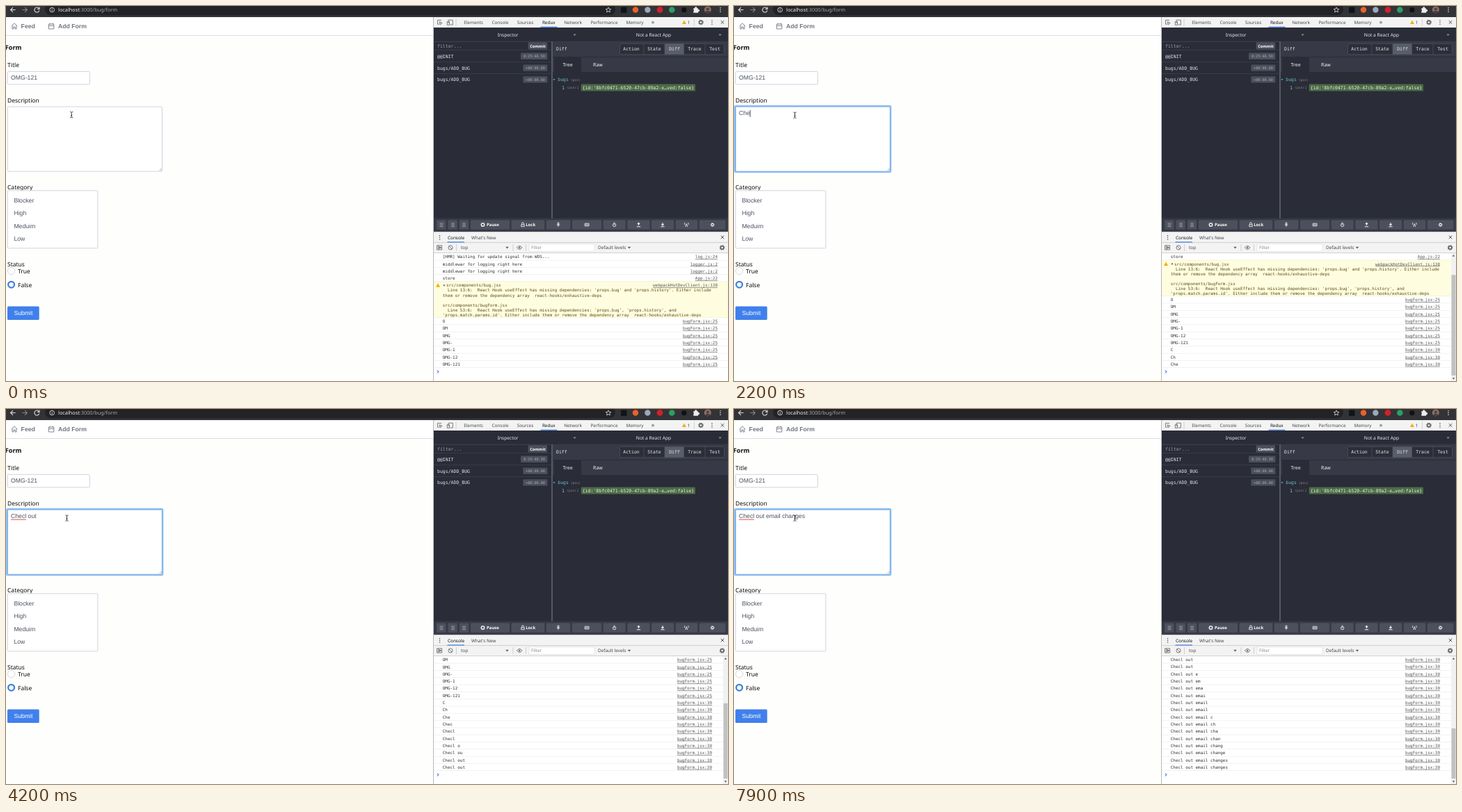
An HTML page for the animation above (8 s loop, 1038 by 540 pixels).

```html
<!DOCTYPE html>
<html lang="en">
<head>
<meta charset="utf-8">
<title>Bug form</title>
<style>
html, body { margin: 0; width: 100%; height: 100%; overflow: hidden; background: #fefefd; }
svg { display: block; }
text { white-space: pre; text-rendering: geometricPrecision; }
.ui { font: 6.4px "Noto Sans", sans-serif; fill: #44474b; }
.label { font: 8.5px "Noto Sans", sans-serif; fill: #0c0c0c; }
.field { font: 8.68px "Liberation Sans", Arial, sans-serif; fill: #4a5160; }
.nav { font: bold 8.68px "Liberation Sans", Arial, sans-serif; fill: #6f7480; }
.mono { font: 6.5px "DejaVu Sans Mono", monospace; fill: #e4e5ea; }
.log { font: 5.95px "DejaVu Sans Mono", monospace; fill: #303030; }
.mid { text-anchor: middle; }
.link { text-anchor: end; text-decoration: underline; fill: #545454; }
.warn { fill: #5c4a10; }
.box { fill: #fff; stroke: #cfd3de; }
.line { fill: none; stroke: #6e6e6e; }
.btn { fill: #4c505c; }
.glyph { fill: none; stroke: #f0f0f3; }
</style>
</head>
<body>
<svg id="stage" width="1038" height="540" viewBox="0 0 1038 540">
  <defs>
    <clipPath id="pane"><rect x="615" y="356" width="423" height="184"/></clipPath>
    <g id="gear"><circle r="2.2" fill="none" stroke="currentColor" stroke-width="1.5"/><circle r="3.3" fill="none" stroke="currentColor" stroke-width="1.1" stroke-dasharray="1.3 1.29"/></g>
    <g id="dots" fill="currentColor"><circle cy="-2.7" r=".8"/><circle r=".8"/><circle cy="2.7" r=".8"/></g>
    <path id="close" d="M-2.3-2.3 2.3 2.3M2.3-2.3-2.3 2.3" stroke="#555" stroke-width="1"/>
    <path id="down" d="M-2.2-1.1H2.2L0 1.5Z"/>
    <path id="alert" d="M0-2.9 3.1 2.6H-3.1Z" fill="#eeb312"/>
  </defs>

  <!-- page -->
  <rect width="615" height="540" fill="#fefefd"/>
  <rect y="16" width="615" height="26" fill="#fff"/>
  <rect y="42" width="615" height="1" fill="#dcdce2"/>
  <g fill="none" stroke="#757a86" stroke-width=".9">
    <path d="M8 28.6 12 25 16 28.6M9 28V33H10.9V30H13.1V33H15V28"/>
    <path d="M61.5 26H68.8V33H61.5ZM61.5 28.4H68.8M63.3 24.6V26.6M67 24.6V26.6"/>
  </g>
  <text class="nav" x="21.6" y="32.1">Feed</text>
  <text class="nav" x="74.9" y="32.1">Add Form</text>
  <text class="label" x="-1.2" y="62.6" style="font-size:9.1px;font-weight:bold">Form</text>
  <text class="label" x="2" y="88">Title</text>
  <text class="label" x="2" y="138.8">Description</text>
  <text class="label" x="2" y="264">Category</text>
  <text class="label" x="2" y="374.7">Status</text>
  <text class="label" x="17" y="385.2">True</text>
  <text class="label" x="17" y="404.6">False</text>
  <rect class="box" x="2.2" y="94.3" width="118.2" height="18.6" rx="1"/>
  <text class="field" x="7" y="106.3">OMG-121</text>
  <rect id="ring" x="1.2" y="144" width="224" height="95" rx="1.6" fill="none" stroke="#4292e6" stroke-opacity=".55" stroke-width="2.4"/>
  <rect id="area" class="box" x="2.4" y="145" width="222" height="93.2" rx="1"/>
  <path d="M220.4 237 223.6 233.8M222.2 237.2 223.8 235.6" stroke="#888" stroke-width=".6"/>
  <text id="typed" class="field" x="7" y="157.3"></text>
  <path id="spell" d="M7 159.2H29" stroke="#e0504c" stroke-width="1" fill="none"/>
  <rect id="caret" y="150" width=".9" height="9.6" fill="#333"/>
  <path id="mouse" d="M-2-4.2Q-.3-4.2 0-3.3Q.3-4.2 2-4.2M0-3.3V3.3M-2 4.2Q-.3 4.2 0 3.3Q.3 4.2 2 4.2M-1 1H1" fill="none" stroke="#222" stroke-width=".9"/>
  <rect class="box" x="2.2" y="265.8" width="129.7" height="83" rx="1"/>
  <text class="field" x="11.4" y="282.7">Blocker</text>
  <text class="field" x="11.4" y="301.1">High</text>
  <text class="field" x="11.4" y="319.5">Meduim</text>
  <text class="field" x="11.4" y="338">Low</text>
  <circle cx="7.6" cy="381.6" r="5.2" fill="#fff" stroke="#cdd1da" stroke-width=".9"/>
  <circle cx="7.6" cy="401.2" r="4.4" fill="#fff" stroke="#3b80df" stroke-width="2.3"/>
  <rect x="2" y="432.5" width="45.7" height="19.6" rx="1.5" fill="#4080ec"/>
  <text class="field mid" x="24.9" y="445.3" style="fill:#fff">Submit</text>

  <!-- browser bar -->
  <rect width="1038" height="16" fill="#323336"/>
  <rect x="56" y="-4" width="820" height="17.3" rx="8.6" fill="#222326"/>
  <g fill="none" stroke="#e2e3e6" stroke-width="1.1">
    <path d="M13.6 5.5H6.8M10 2.2 6.6 5.5 10 8.8"/>
    <path d="M23.4 5.5H30.2M27 2.2 30.4 5.5 27 8.8" stroke="#85878b"/>
    <path d="M47 3.2A3.5 3.5 0 1 0 47.8 6.4M48 1.6V4.4H45.2"/>
    <circle cx="66.2" cy="5.5" r="3.3" stroke-width=".9"/>
    <path d="M66.2 5V7.4M66.2 3.4V4.3" stroke-width=".9"/>
    <path d="M866 1.8 867.1 4.3 869.8 4.5 867.8 6.3 868.4 8.9 866 7.5 863.6 8.9 864.2 6.3 862.2 4.5 864.9 4.3Z" stroke-width=".8"/>
  </g>
  <text x="75" y="8.1" class="ui" style="font-size:7.3px;fill:#f2f2f3">localhost<tspan fill="#a5a7ab">:3000/bug/form</tspan></text>
  <rect x="884" y="1.5" width="8.4" height="8.4" fill="#11141c"/>
  <circle cx="905" cy="5.5" r="4.2" fill="#e8622a"/>
  <circle cx="922.4" cy="5.5" r="4.2" fill="#9aa9bd"/>
  <circle cx="940" cy="5.5" r="4.4" fill="#d3202c"/>
  <circle cx="957.3" cy="5.5" r="4.3" fill="#2a9f67"/>
  <circle cx="974.8" cy="5.7" r="3.6" fill="#111214"/>
  <path d="M988.3 3.2H990.4A1.5 1.5 0 1 1 993.2 3.2H995.2V5.2A1.4 1.4 0 1 1 995.2 7.8V9.8H988.3V7.4A1.2 1.2 0 0 0 988.3 5.2Z" fill="#eee"/>
  <circle cx="1008.8" cy="5.4" r="5" fill="#8b6f60"/>
  <path d="M1005.3 9Q1005.6 6.7 1008.8 6.7T1012.3 9Q1008.8 11.6 1005.3 9Z" fill="#463c45"/>
  <circle cx="1008.8" cy="4.3" r="1.9" fill="#463c45"/>
  <use href="#dots" x="1027" y="5.5" color="#eee"/>

  <!-- developer tools tabs -->
  <rect x="614" y="16" width="424" height="524" fill="#f3f3f3"/>
  <rect x="614" y="16" width="1" height="524" fill="#b9b9bb"/>
  <g class="line" stroke-width=".9">
    <path d="M626 20.4H620.5V26.2H623M623 22.8 627.2 24.4 625.3 25.2 624.5 27Z"/>
    <path d="M636 25V20.2H642.3V27H638.6M634.2 22.7H637.6V27.3H634.2Z"/>
    <path d="M647 18.5V28.5M989.5 18.5V28.5" stroke="#ccc"/>
  </g>
  <g class="ui mid">
    <text x="672" y="25.8">Elements</text><text x="710.5" y="25.8">Console</text>
    <text x="746.5" y="25.8">Sources</text><text x="780.3" y="25.8" fill="#111">Redux</text>
    <text x="815" y="25.8">Network</text><text x="860" y="25.8">Performance</text>
    <text x="904" y="25.8">Memory</text><text x="930" y="25.8" font-size="9">»</text>
    <text x="981.6" y="25.8">1</text>
  </g>
  <rect x="768.5" y="29.6" width="24" height="1.2" fill="#3f7fe4"/>
  <use href="#alert" x="975" y="23.4"/>
  <use href="#gear" x="999" y="23.5" color="#5c5c5c"/>
  <use href="#dots" x="1015" y="23.5" color="#555"/>
  <use href="#close" x="1030" y="23.4"/>

  <!-- state inspector -->
  <rect x="615" y="31" width="423" height="294" fill="#2a2c38"/>
  <path d="M615 51.3H1038" stroke="#40434f"/>
  <g class="ui mid" style="font-size:6.7px;fill:#e6e7eb">
    <text x="721.6" y="43.9">Inspector</text><text x="931" y="43.9">Not a React App</text>
  </g>
  <g fill="#8a8d97"><use href="#down" x="817.5" y="41.6"/><use href="#down" x="1026.6" y="41.6"/></g>
  <rect x="786" y="51.5" width="252" height="43.5" fill="#373a46"/>
  <path d="M786 73.5H1038" stroke="#2a2c38"/>
  <rect x="788" y="74" width="39" height="21" fill="#2a2c38"/>
  <path d="M615 63.4H784M615 80.7H784M615 97.4H784" stroke="#3c3f4b" stroke-width=".9"/>
  <rect x="784" y="51" width="2" height="255" fill="#555966"/>
  <rect x="750.6" y="52.3" width="27.6" height="10.2" rx="1.4" class="btn"/>
  <text class="ui mid" x="764.4" y="59.5" style="font-size:5.7px;font-weight:bold;fill:#fff">Commit</text>
  <g class="mono">
    <text x="620" y="59.7" fill="#9a9da7" style="fill:#9a9da7">filter...</text>
    <text x="620" y="74.6">@@INIT</text>
    <text x="620" y="91.5">bugs/ADD_BUG</text>
    <text x="620" y="108.2">bugs/ADD_BUG</text>
    <text x="791" y="64">Diff</text>
  </g>
  <g class="btn">
    <rect x="740" y="67.6" width="38.4" height="9.4" rx="1.4"/>
    <rect x="743.4" y="84.4" width="35" height="9.4" rx="1.4"/>
    <rect x="743.4" y="101.2" width="35" height="9.4" rx="1.4"/>
  </g>
  <g class="mono mid" style="font-size:5.15px;fill:#a9acb5">
    <text x="759.4" y="74.2">8:25:40.59</text><text x="761" y="91">+00:00.00</text><text x="761" y="107.8">+00:00.00</text>
  </g>
  <g fill="#2c2e3a" stroke="#4d515d" stroke-width=".8">
    <rect x="882.5" y="54.2" width="150" height="15.6" rx="1.5"/>
    <rect x="947" y="54.2" width="27.6" height="15.6" fill="#5a5e6b"/>
    <path d="M917 54V70M1005 54V70"/>
  </g>
  <g class="mono mid">
    <text x="899" y="63.9">Action</text><text x="932" y="63.9">State</text><text x="961" y="63.9">Diff</text>
    <text x="990" y="63.9">Trace</text><text x="1019" y="63.9">Test</text>
  </g>
  <g class="ui mid" style="font-size:7px;fill:#f4f4f6"><text x="807.5" y="87">Tree</text><text x="851" y="87">Raw</text></g>
  <use href="#down" transform="translate(788 106) scale(.75)" fill="#62b5c4"/>
  <text class="mono" x="793.3" y="108.1" style="fill:#6cbccb">bugs</text>
  <text class="mono" x="811.8" y="107.7" style="font-size:4.5px;fill:#8e929c">(pin)</text>
  <text class="mono" x="799" y="119.8" style="fill:#8fc7d2">1</text>
  <text class="mono" x="806.6" y="119.4" style="font-size:4.5px;fill:#8e929c">(pin)<tspan font-size="6.5" fill="#8fc7d2">:</tspan></text>
  <rect x="826.8" y="112.6" width="164.2" height="10" rx="1.2" fill="#4d6b46"/>
  <text class="mono" x="828.8" y="119.9" style="fill:#e9f0e4">{id:'8bfc0471-b520-47cb-89a2-e…ved:false}</text>

  <rect x="615" y="305.6" width="423" height="19.4" fill="#373a46"/>
  <g class="btn" id="buttons"></g>
  <g class="glyph" stroke-width=".9">
    <path d="M623.5 313H628.5M623.5 315.2H628.5M623.5 317.4H628.5M640 313H645M640 315.2H645M640 317.4H645M656 313H661M656 315.2H661M656 317.4H661" stroke="#a5a8b1"/>
    <circle cx="685.5" cy="315" r="2.2" stroke-width="1.5"/>
    <path d="M740.8 314.8H745.2V317.6H740.8ZM741.6 314.6V313.2A1.4 1.4 0 0 1 744.4 313.2V314.6"/>
    <path d="M792.6 312.2H795.4M793.2 312.4V315H794.8V312.4M791.8 315.3H796.2M794 315.4V318"/>
    <path d="M832.2 313.2H838V316.8H832.2ZM833 315H837.2"/>
    <circle cx="874.6" cy="315.5" r="2.2"/><path d="M873.6 312.2H875.6M874.6 314.2V315.6"/>
    <path d="M909.5 316V312.4M907.8 314 909.5 312.2 911.2 314M906.8 317.8H912.2" stroke-width="1.1"/>
    <path d="M944 312V315.8M942.3 314.2 944 316 945.7 314.2M941.3 317.8H946.7" stroke-width="1.1"/>
    <path d="M976.8 318 978.3 313.6 979.8 318M976 315A2.4 2.4 0 0 1 976 312M980.6 315A2.4 2.4 0 0 0 980.6 312"/>
  </g>
  <use href="#gear" transform="translate(1015.6 315) scale(.75)" color="#f0f0f3"/>
  <g class="ui" style="font-size:6px;font-weight:bold;fill:#fff"><text x="691" y="317.2">Pause</text><text x="747.2" y="317.2">Lock</text></g>

  <!-- console drawer -->
  <rect x="615" y="325" width="423" height="31" fill="#f3f3f3"/>
  <path d="M615 325.4H1038M615 340.6H1038M615 355.6H1038" stroke="#cacaca" stroke-width=".9"/>
  <rect x="634.5" y="339.4" width="24.5" height="1.2" fill="#3f7fe4"/>
  <use href="#dots" x="623.5" y="333.3" color="#555"/>
  <use href="#close" x="1030" y="333"/>
  <g class="ui">
    <text x="635" y="335.7" style="fill:#111">Console</text><text x="669" y="335.7">What's New</text>
    <text x="654" y="350.2">top</text><text x="851" y="350.2">Default levels</text>
  </g>
  <rect x="752" y="342.8" width="94" height="10.4" fill="#fff" stroke="#dedede" stroke-width=".7"/>
  <text class="ui" x="755" y="350.2" style="fill:#858585">Filter</text>
  <g class="line" stroke-width=".9">
    <path d="M619.6 344.8H626.6V351H619.6ZM621.6 345V351"/><path d="M623 346.3 625.6 347.9 623 349.5Z" fill="#6e6e6e"/>
    <circle cx="639" cy="347.9" r="3.1"/><path d="M636.9 345.8 641.1 350"/>
    <path d="M734.4 347.9Q738.2 342.8 742 347.9Q738.2 353 734.4 347.9Z"/><circle cx="738.2" cy="347.9" r="1" fill="#6e6e6e"/>
    <path d="M647.5 343V353M729 343V353M747.5 343V353" stroke="#ccc"/>
  </g>
  <g fill="#555"><use href="#down" x="720.5" y="347.9"/><use href="#down" x="896" y="347.9"/></g>
  <use href="#gear" x="1029.6" y="347.9" color="#5c5c5c"/>
  <rect x="615" y="356" width="423" height="184" fill="#fff"/>
  <g clip-path="url(#pane)">
    <g id="rows">
      <path id="prompt" d="M619.9 524.6 621.9 526.6 619.9 528.6" fill="none" stroke="#3f7fe4" stroke-width="1.1"/>
    </g>
    <g id="bar">
      <rect x="1031" y="356" width="7" height="184" fill="#f1f1f1"/>
      <path d="M1032.7 360.4H1036.3L1034.5 358.2ZM1032.7 535.6H1036.3L1034.5 537.8Z" fill="#505050"/>
      <rect id="thumb" x="1031.5" width="6" fill="#c1c1c1"/>
    </g>
  </g>
</svg>
<script>
const NS = "http://www.w3.org/2000/svg", LOOP = 8000;
const ROW = 10.31, TOP = 356, VIEW = 184;
const MESSAGE = "Checl out email changes ";
const $ = id => document.getElementById(id);

function add(parent, tag, attrs, content = "") {
  const el = document.createElementNS(NS, tag);
  for (const key in attrs) el.setAttribute(key, attrs[key]);
  el.textContent = content;
  return parent.appendChild(el);
}

// left edge and width of each toolbar button
[[619, 13.4], [635.4, 13.4], [651.8, 13.4], [668, 56], [726.6, 47.6], [776.8, 34.4], [814, 42],
 [858.6, 32], [893.4, 32.2], [928, 32.2], [962.8, 31.4], [996.8, 37.6]]
  .forEach(([x, width]) => add($("buttons"), "rect", { x, y: 308.2, width, height: 13.6, rx: 1.4 }));

// console content
const rows = $("rows"), links = [];
let y = TOP;
function link(parent, name) {
  links.push(add(parent, "text", { class: "log link", x: 1023, y: y + 7.2 }, name));
}
function log(message, file) {
  const g = add(rows, "g", {});
  add(g, "text", { class: "log", x: 627.8, y: y + 7.2 }, message);
  link(g, file);
  y += ROW;
  add(g, "rect", { x: 615, y: y - .5, width: 423, height: .6, fill: "#e9e9e9" });
  return g;
}
function warning() {
  add(rows, "rect", { x: 615, y: y - .3, width: 423, height: ROW * 5, fill: "#fefde0", stroke: "#f3eec0", "stroke-width": .6 });
  add(rows, "use", { href: "#alert", x: 621, y: y + 5 });
  add(rows, "path", { d: `M629 ${y + 3.4}L631.6 ${y + 5}L629 ${y + 6.6}Z`, fill: "#6e6a50" });
  link(rows, "webpackHotDevClient.js:138");
  const tail = "the dependency array  react-hooks/exhaustive-deps";
  ["src/components/bug.jsx",
   "  Line 13:6:  React Hook useEffect has missing dependencies: 'props.bug' and 'props.history'. Either include",
   "them or remove " + tail,
   "",
   "src/components/bugForm.jsx",
   "  Line 53:6:  React Hook useEffect has missing dependencies: 'props.bug', 'props.history', and",
   "'props.match.params.id'. Either include them or remove " + tail
  ].forEach((s, i) => add(rows, "text", { class: "log warn", x: i ? 627.8 : 633, y: y + 7.2 + i * 7.05 }, s));
  y += ROW * 5;
}
log("[HMR] Waiting for update signal from WDS...", "log.js:24");
log("middlewar for logging right here", "logger.js:2");
log("middlewar for logging right here", "logger.js:2");
log("store", "App.js:22");
warning();
const title = "OMG-121";
for (let i = 1; i <= title.length; i++) log(title.slice(0, i), "bugForm.jsx:25");
const entries = [...MESSAGE].map((_, i) => log(MESSAGE.slice(0, i + 1), "bugForm.jsx:30"));

// time, characters in the field, characters logged
const keys = [
  [0, 0, 0], [1900, 1, 1], [2100, 2, 2], [2200, 3, 3], [2400, 4, 4], [2500, 5, 5], [2700, 7, 7],
  [3000, 8, 8], [3100, 9, 8], [3500, 10, 9], [3600, 10, 10], [4800, 11, 11], [4900, 12, 12],
  [5300, 14, 14], [5500, 15, 14], [6000, 16, 15], [6100, 16, 16], [6300, 17, 17], [6400, 18, 18],
  [6600, 19, 19], [6800, 21, 21], [6900, 22, 22], [7100, 23, 23], [7300, 24, 24]
];
const caretOn = [[600, 1100], [1700, 4200], [4800, 7900]];
const show = (el, on) => el.setAttribute("visibility", on ? "visible" : "hidden");

function render(t) {
  const [, chars, logged] = keys.filter(k => k[0] <= t).pop();
  const typed = $("typed");
  typed.textContent = MESSAGE.slice(0, chars);
  show($("spell"), chars > 5);
  $("caret").setAttribute("x", 6.8 + (chars ? typed.getComputedTextLength() : .2));
  show($("caret"), caretOn.some(([a, b]) => t >= a && t < b));

  const move = Math.min(3, Math.floor(t / 100)) / 3;
  $("mouse").setAttribute("transform", `translate(${94.2 - 6.7 * move} ${156.6 + .5 * move})`);

  const focus = t < 600 ? 0 : t < 700 ? .5 : 1;
  $("ring").setAttribute("opacity", focus);
  $("area").style.stroke = focus ? "#6aa7ea" : "";

  const shift = logged * ROW;
  rows.setAttribute("transform", `translate(0 ${-shift})`);
  $("prompt").setAttribute("transform", `translate(0 ${shift})`);
  entries.forEach((g, i) => g.setAttribute("display", i < logged ? "inline" : "none"));
  links.forEach(el => el.setAttribute("x", logged ? 1015 : 1023));
  show($("bar"), logged > 0);
  const size = 169 * VIEW / (VIEW + shift);
  $("thumb").setAttribute("y", 532 - size);
  $("thumb").setAttribute("height", size);
}

const start = performance.now();
function tick() {
  render((performance.now() - start) % LOOP);
  requestAnimationFrame(tick);
}
tick();
</script>
</body>
</html>
```
